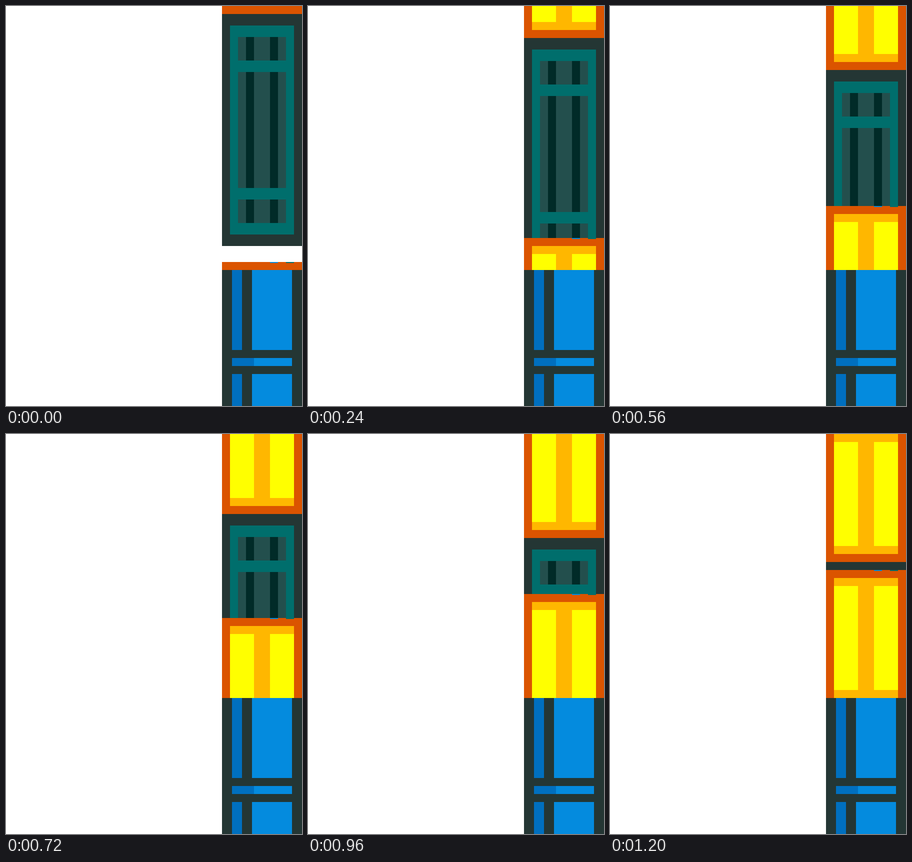
An HTML page for the animation above (1280 ms loop, 592 px wide and 800 px high).

```html
<!DOCTYPE html>
<html lang="en">
<head>
<meta charset="utf-8">
<title>Sliding gate</title>
<style>
  html, body { margin: 0; width: 100%; height: 100%; overflow: hidden; background: #fff; }
  svg { display: block; }
</style>
</head>
<body>
<svg id="stage" width="592" height="800" viewBox="0 0 592 800" shape-rendering="crispEdges"></svg>
<script>
const NS = "http://www.w3.org/2000/svg";
const LOOP = 1280, STEPS = 16, TRAVEL = 256;
const C = {
  orange: "#db5400", amber: "#ffb700", yellow: "#ffff00",
  dark: "#243634", teal: "#006e6c", glass: "#234f4d", bar: "#012b28",
  blue: "#006fbf", sky: "#048bde"
};
const stage = document.getElementById("stage");

function group() {
  return stage.appendChild(document.createElementNS(NS, "g"));
}

function rect(parent, x, y, w, h, fill) {
  const r = document.createElementNS(NS, "rect");
  Object.entries({ x, y, width: w, height: h, fill })
    .forEach(([k, v]) => r.setAttribute(k, v));
  parent.appendChild(r);
}

function door(g, y) {
  rect(g, 432, y, 160, 272, C.orange);
  rect(g, 448, y + 16, 128, 240, C.amber);
  for (const x of [448, 528]) rect(g, x, y + 32, 48, 208, C.yellow);
}

function panel(g, y) {
  rect(g, 432, y, 160, 464, C.dark);
  rect(g, 448, y + 23, 128, 418, C.teal);
  for (const [top, h] of [[46, 47], [116, 232], [371, 47]]) {
    rect(g, 464, y + top, 96, h, C.glass);
    for (const x of [480, 528]) rect(g, x, y + top, 16, h, C.bar);
  }
}

function base(g) {
  rect(g, 432, 528, 160, 272, C.dark);
  for (const [y, h] of [[528, 160], [736, 64]]) {
    rect(g, 452, y, 20, h, C.blue);
    rect(g, 492, y, 80, h, C.sky);
  }
  rect(g, 452, 704, 44, 16, C.blue);
  rect(g, 496, 704, 76, 16, C.sky);
}

function slide(g, dy) {
  g.animate(
    [{ transform: "translateY(0px)" }, { transform: `translateY(${dy}px)` }],
    { duration: LOOP, iterations: Infinity, easing: `steps(${STEPS}, end)` }
  );
}

const upper = group(), lower = group();
panel(upper, 16);
door(upper, -256);
door(lower, 512);
rect(lower, 528, 512, 16, 2, C.sky);
rect(lower, 560, 512, 16, 2, C.teal);
base(group());

slide(upper, TRAVEL);
slide(lower, -TRAVEL);
</script>
</body>
</html>
```
